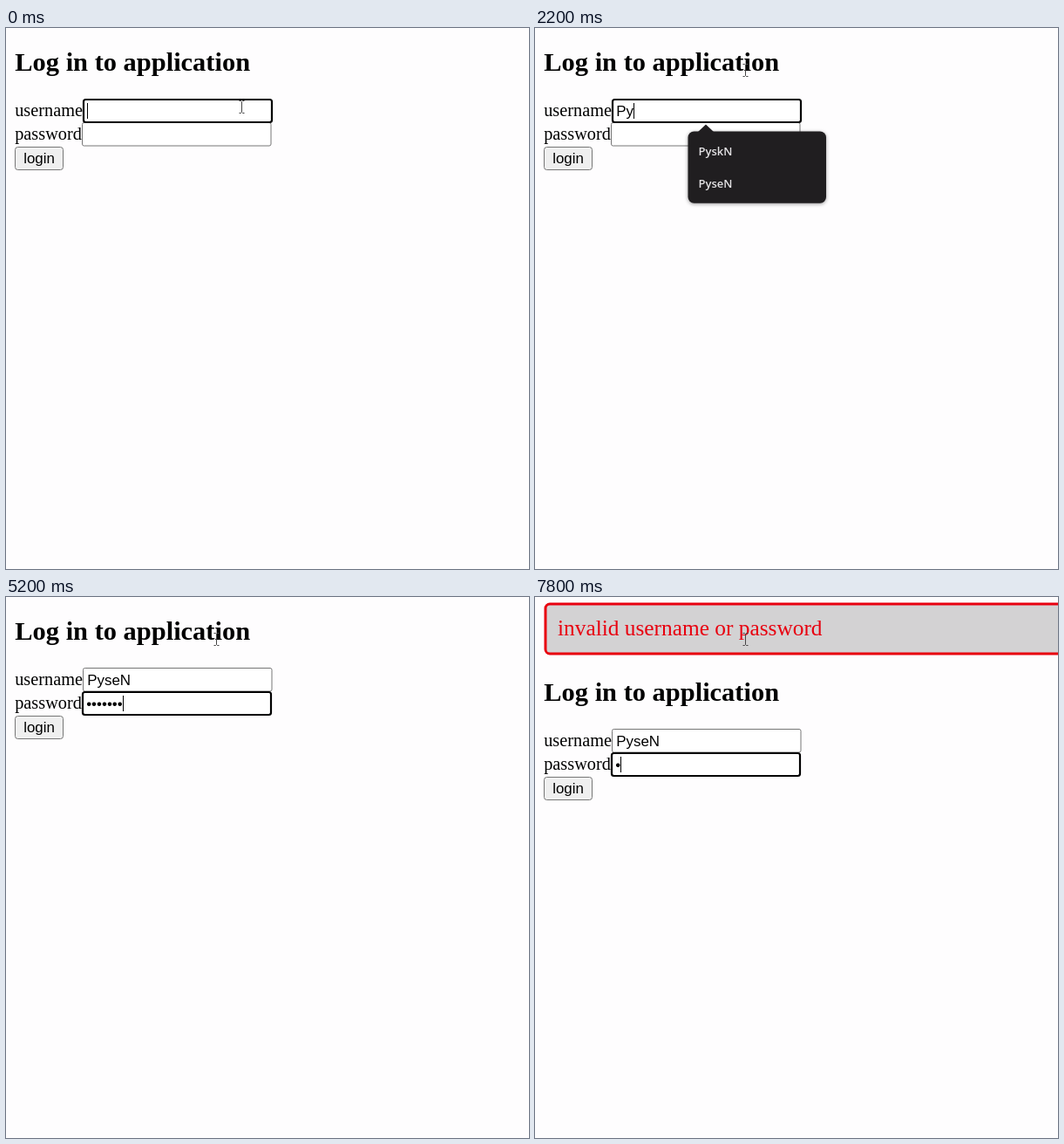
An HTML page with a canvas for the animation above (8000 ms loop, 600 by 620 pixels).

```html
<!DOCTYPE html>
<html lang="en">
<head>
<meta charset="utf-8">
<title>Login form</title>
<style>
  html, body { margin: 0; width: 100%; height: 100%; overflow: hidden; background: #fefdfe; }
  canvas { display: block; }
</style>
</head>
<body>
<canvas id="stage" width="600" height="620"></canvas>
<script>
const ctx = document.getElementById('stage').getContext('2d');

const LOOP = 8000;
const EM = 20.3;
const SERIF = '"Liberation Serif", serif';
const FIELD_FONT = '16.93px "Liberation Sans", sans-serif';
const POPUP_FONT = '600 13px "Open Sans", sans-serif';
const BORDER = '#767676';

const USER = 'PyseN';
const SAVED = ['PyskN', 'fern', USER, 'puzgen', 'lnpe'];

// Steps as [time, value]; the last one reached counts.
const POINTER = [[0, [270, 90]], [1000, [265, 80]], [1200, [250, 58]], [1400, [241, 48]]];
const TYPED = [[0, 0], [2000, 1], [2200, 2], [2400, 3], [2600, 4], [3000, 5]];
const DOTS = [
  [0, 0], [4600, 2], [4800, 4], [5000, 5], [5200, 7],
  [6600, 6], [6800, 5], [7000, 3], [7200, 1], [7400, 0], [7800, 1]
];
const POPUP_OPEN = 200, POPUP_CLOSE = 3000, FOCUS_PASSWORD = 3400, ERROR = 5600;

function at(steps, t) {
  let value;
  for (const [start, v] of steps) if (t >= start) value = v;
  return value;
}

function text(str, x, y, font, color = '#000') {
  ctx.font = font;
  ctx.fillStyle = color;
  ctx.fillText(str, x, y);
}

function box(x, y, w, h, r, fill, stroke, line = 1) {
  ctx.beginPath();
  ctx.roundRect(x, y, w, h, r);
  ctx.fillStyle = fill;
  ctx.fill();
  if (!stroke) return;
  ctx.strokeStyle = stroke;
  ctx.lineWidth = line;
  ctx.stroke();
}

function field(x, y, value, focused) {
  if (focused) box(x + 1, y + 1, 216, 26, 2.5, '#fff', '#000', 2.2);
  else box(x + 0.5, y + 0.5, 216.5, 26.5, 2, '#fff', BORDER);
  const left = x + 5.2;
  text(value, left, y + 20, FIELD_FONT);
  if (focused) {
    const caret = Math.round(left + ctx.measureText(value).width);
    ctx.fillRect(caret, y + 5, 1, 18);
  }
}

function form(t) {
  const inPassword = t >= FOCUS_PASSWORD;
  const username = () => field(88, 81, USER.slice(0, at(TYPED, t)), !inPassword);
  const password = () => field(87, 108, '•'.repeat(at(DOTS, t)), inPassword);

  text('Log in to application', 10.3, 48.7, `bold ${EM * 1.5}px ${SERIF}`);
  text('username', 10.2, 101, `${EM}px ${SERIF}`);
  text('password', 10.2, 128, `${EM}px ${SERIF}`);

  // The focused field lies on top.
  if (inPassword) { username(); password(); }
  else { password(); username(); }

  box(10.5, 136.5, 55, 26, 3, '#efefef', BORDER);
  text('login', 20.2, 155, FIELD_FONT);
}

function popup(prefix) {
  const rows = SAVED.filter(s => s.toLowerCase().startsWith(prefix.toLowerCase()));
  const pitch = 36.7;
  const fill = '#201e20';

  ctx.save();
  ctx.shadowColor = 'rgba(0,0,0,.4)';
  ctx.shadowBlur = 4;
  ctx.shadowOffsetY = 1;
  box(175.5, 118.5, 158.5, 45.5 + pitch * (rows.length - 1), 7, fill);
  ctx.restore();

  ctx.beginPath();
  ctx.moveTo(187, 119);
  ctx.lineTo(196, 110.5);
  ctx.lineTo(205, 119);
  ctx.fillStyle = fill;
  ctx.fill();

  rows.forEach((s, i) => text(s, 187.5, 146.3 + pitch * i, POPUP_FONT, '#e4e3e5'));
}

function banner() {
  const red = '#e8000f';
  box(12, 8, 620, 57, 5, '#d3d2d3', red, 3);
  text('invalid username or password', 26, 44.2, `${EM * 1.25}px ${SERIF}`, red);
}

function pointer([x, y]) {
  ctx.beginPath();
  for (const s of [-1, 1]) {
    ctx.moveTo(x - 3, y + 7 * s);
    ctx.lineTo(x - 1, y + 7 * s);
    ctx.lineTo(x, y + 6 * s);
    ctx.lineTo(x + 1, y + 7 * s);
    ctx.lineTo(x + 3, y + 7 * s);
  }
  ctx.moveTo(x, y - 6);
  ctx.lineTo(x, y + 6);
  ctx.strokeStyle = '#444';
  ctx.lineWidth = 1;
  ctx.stroke();
}

function draw(t) {
  ctx.fillStyle = '#fefdfe';
  ctx.fillRect(0, 0, 600, 620);

  ctx.save();
  if (t >= ERROR) {
    banner();
    ctx.translate(0, 70);
  }
  form(t);
  ctx.restore();

  if (t >= POPUP_OPEN && t < POPUP_CLOSE) popup(USER.slice(0, at(TYPED, t)));
  const [x, y] = at(POINTER, t);
  pointer([x + 0.5, y + 0.5]);
}

const start = performance.now();
function tick() {
  draw((performance.now() - start) % LOOP);
  requestAnimationFrame(tick);
}
tick();
</script>
</body>
</html>
```
